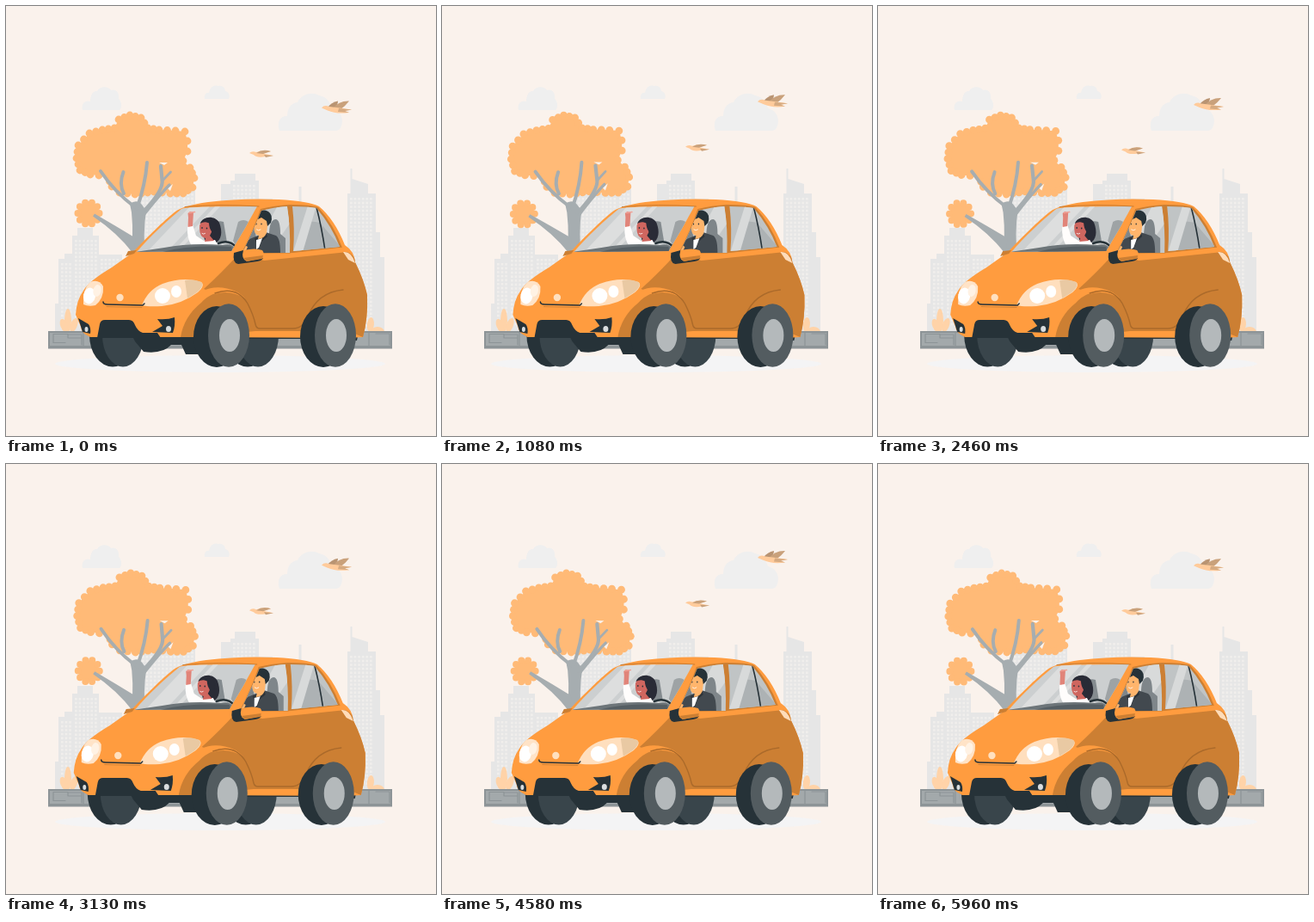
Recreate the animation shown at these times as an HTML page with a canvas. Size 500x500 px, loop 6000 ms.

```html
<!DOCTYPE html>
<html lang="en">
<head>
<meta charset="utf-8">
<title>City drive</title>
<style>
html, body { margin: 0; width: 100%; height: 100%; overflow: hidden; background: #faf2ec; }
canvas { display: block; width: 500px; height: 500px; }
</style>
</head>
<body>
<canvas id="stage" width="500" height="500"></canvas>
<script>
const canvas = document.getElementById('stage');
const ctx = canvas.getContext('2d');
const LOOP = 6000;
const SKY = '#faf2ec', CITY = '#e6e6e6', CLOUD = '#efefef', LEAF = '#ffba77', BARK = '#a6adb0';
const ORANGE = '#ff9c3f', SHADE = '#cc7f33', SEAM = '#ab6a2a', DARK = '#263238';

function fill(d, color) {
  ctx.fillStyle = color;
  ctx.fill(new Path2D(d));
}
function line(d, color, width) {
  ctx.strokeStyle = color;
  ctx.lineWidth = width;
  ctx.stroke(new Path2D(d));
}
function oval(x, y, rx, ry, color, turn = 0) {
  ctx.fillStyle = color;
  ctx.beginPath();
  ctx.ellipse(x, y, rx, ry, turn, 0, Math.PI * 2);
  ctx.fill();
}
function box(x, y, w, h, color) {
  ctx.fillStyle = color;
  ctx.fillRect(x, y, w, h);
}
function clipped(d, draw) {
  ctx.save();
  ctx.clip(new Path2D(d));
  draw();
  ctx.restore();
}
function moved(x, y, draw) {
  ctx.save();
  ctx.translate(x, y);
  draw();
  ctx.restore();
}

// Linear interpolation between [time, value] stops
function track(p, stops) {
  let i = 1;
  while (i < stops.length - 1 && p > stops[i][0]) i++;
  const [a, u] = stops[i - 1], [b, v] = stops[i];
  return u + (v - u) * (p - a) / (b - a);
}
const SHAKE = [0, -1, 2, -4, 4, -4, 4, -4, 2, -1, 0].map((v, i) => [i / 10, v]);
const SWAY = [[0, 0], [.25, 1], [.75, -1], [1, 0]];

function windows(x, y, w, h) {
  for (let j = 0; j + 2 <= h; j += 4.6)
    for (let i = 0; i + 2 <= w; i += 4.6) box(x + i, y + j, 2.7, 2.7, '#f0eeec');
}
function tower(x, y, w, bare) {
  box(x, y, w, 380 - y, CITY);
  if (!bare) windows(x + 3, y + 5, w - 5, 370 - y);
}

function clouds() {
  fill('M89 121C87 113 93 109 98 111C98 104 101 98 106 99C109 93 119 93 122 98C128 96 132 101 131 108C135 111 135 119 132 121Z', CLOUD);
  fill('M231 108C230 103 233 100 236 101C237 94 242 91 247 93C252 92 255 96 255 99C259 100 261 104 259 108Z', CLOUD);
  fill('M318 145C315 136 318 127 327 128C327 119 331 113 339 112C343 103 355 99 364 104C374 106 377 113 379 119C389 121 394 132 389 142Q387 145 384 145Z', CLOUD);
}

function city() {
  tower(57, 346, 6, true);
  tower(61, 294, 26);
  box(68, 288, 14, 8, CITY);
  tower(77, 267, 31);
  box(83, 258, 18, 10, CITY);
  tower(107, 289, 28);
  tower(155, 218, 63);
  tower(203, 213, 17);
  tower(250, 207, 14, true);
  tower(261, 203, 33);
  box(266, 195, 24, 9, CITY);
  tower(292, 224, 18, true);
  box(340.5, 210, 3, 40, CITY);
  tower(397, 218, 33);
  fill('M400.5 219V189H402.5V201L421 207V219Z', CITY);
  tower(429, 263, 6, true);
  tower(434, 292, 6, true);
}

function leaf(x, h, turn) {
  ctx.save();
  ctx.translate(x, 379);
  ctx.rotate(turn);
  oval(0, -h / 2, 4, h / 2, '#ffd3a8');
  ctx.restore();
}

function street() {
  oval(249, 416, 192, 10, '#f4f4f5');
  leaf(72, 27, 0);
  leaf(70, 16, -.35);
  leaf(76, 17, .35);
  leaf(423, 17, .1);
  oval(432, 379, 8, 6, '#ffd3a8');
  box(49, 378, 400, 20.5, '#8d9497');
  box(51, 380, 396, 15, '#a3a9ab');
  line('M55 381.5H72V386H88M55 381.5V391.5H69M73 382H88V394M90 380V395M422 380V395M430 381H446V394', '#8d9497', 1.2);
}

// Fills a rounded outline with small bumps along its rim
function leafy(points, r) {
  ctx.fillStyle = LEAF;
  ctx.beginPath();
  points.forEach(([x, y]) => ctx.lineTo(x, y));
  ctx.fill();
  points.forEach(([x, y], i) => {
    const [u, v] = points[(i + 1) % points.length];
    const n = Math.max(1, Math.round(Math.hypot(u - x, v - y) / (r * 1.9)));
    for (let k = 0; k < n; k++) oval(x + (u - x) * k / n, y + (v - y) * k / n, r, r, LEAF);
  });
}
const CROWN = [[144, 127], [131, 132], [126, 142], [112, 144], [97, 148], [84, 162], [82, 177], [86, 191], [98, 196],
  [118, 198], [123, 210], [132, 217], [150, 219], [172, 216], [191, 218], [206, 218], [217, 211], [219, 200],
  [214, 188], [206, 180], [211, 169], [211, 157], [208, 146], [197, 145], [178, 144], [165, 142], [157, 130]];
const TUFT = Array.from({ length: 10 }, (_, i) => {
  const a = i / 10 * Math.PI * 2;
  return [96 + 12.5 * Math.cos(a), 241 + 13 * Math.sin(a)];
});

function tree(angle) {
  ctx.save();
  ctx.translate(150, 285);
  ctx.rotate(angle * Math.PI / 180);
  ctx.translate(-150, -285);
  leafy(CROWN, 4.4);
  leafy(TUFT, 4);
  fill('M178 182L188 182L184 185ZM188 212L194 207L191 215Z', SKY);
  fill('M144 298Q149 270 146 240L144 230Q152 224 158 231L163 238Q159 263 162 298Z', BARK);
  line('M150 234Q126 216 110 192M137 218Q131 207 136.5 193', BARK, 4);
  line('M152 236Q162 208 164 182', BARK, 4);
  line('M158 241Q184 214 181.5 202L180 186', BARK, 4.2);
  line('M183 202L191.5 193', BARK, 2.8);
  line('M160 243Q179 219 190 208', BARK, 3.4);
  fill('M103 241.5Q128 256 151 270L148 288Q130 264 101 244.5Z', BARK);
  ctx.restore();
}

function birds(y) {
  moved(0, y, () => {
    fill('M374 118Q378 112 386 110.5Q386 115 381 120Z', '#b99472');
    fill('M380 119Q387 110 399 110.5Q395 116 388 121Z', '#c9a17b');
    fill('M367 118.5Q370 114.5 376 117L388 118.5L402 120.5L394 122L399 124Q384 126 374 121.5Z', '#ffcb9b');
    fill('M387 119L402 120.5L394 122L399 124L386 123Z', '#d6ab82');
    fill('M283 171Q286 168 291 170Q299 167 308 169L299 171.5L311 174L302 175Q292 177 288 173Z', '#ffcb9b');
    fill('M291 171Q298 166 308 169L299 172ZM300 173L311 174L302 176Z', '#c9a17b');
  });
}

function wheel(x) {
  oval(x - 14, 384.5, 27, 35.5, DARK);
  oval(x, 383, 24, 36.7, '#535c60');
  oval(x + 1, 383, 12, 19, '#b4b9bb');
}
function farWheel(x) {
  oval(x - 12, 383, 27, 36.5, DARK);
  oval(x, 383, 24, 36.5, '#39454b');
}

function woman() {
  fill('M227 254C227 244 243 243 248 252C252 262 251 272 243 276L231 272Z', '#292b36');
  fill('M211 256L217 254L221 267L230 273L243 272L247 279L216 279Q210 270 211 256Z', '#fffdfc');
  fill('M211.5 257L212 246L211.5 241L214 239L218 240L217 256Z', '#e18479');
  line('M213 240.5L219.5 239.5', '#f0a297', 1.6);
  fill('M225 258Q225 250 231 250L239 254L239 263L237 267L242 273L231 274L232 270Q225 269 225 258Z', '#cf665f');
  fill('M225.5 253Q228 246 236 247Q245 248 245 261L239.5 263Q236 258 236 252Q230 250 225.5 253Z', '#292b36');
  line('M228 264.5Q229.5 266 231.5 264.5', '#fff', .8);
  oval(228, 258, .8, 1, DARK);
  oval(233.5, 258.5, .8, 1, DARK);
}

function man() {
  fill('M277 283Q277 272 288 269L302 263L314 267Q319 270 319 287H275Z', '#42494f');
  fill('M289 270L297 267L302 263L304 268L297 274L294 283Z', '#2e3439');
  fill('M291 272L298 270L294 281L291 283Z', '#fff');
  fill('M289 247L302 244L307 252L304 256L303 264Q300 271 293 271L294 267Q288 266 288.5 257Z', '#ffb56c');
  fill('M288 248Q287 241 292 239.5Q299 235.5 305 239Q311 243 308 252L304 256L303 250L297 246Q292 249 288 248Z', DARK);
  oval(291, 253.5, .7, 1, DARK);
  oval(297, 253.5, .7, 1, DARK);
  line('M291.5 260Q293.5 262 296 260', '#fff', .8);
  fill('M272 280L276 277L281 280L278 287L270 288Z', '#ffb56c');
}

const FRONT_GLASS = 'M152 286C167 268 188 249 204 236Q208 233 292 233Q278 259 262 285Z';
const DOOR_GLASS = 'M275 287Q289 258 297 238Q311 234 327 233Q331 259 330 287Z';
const REAR_GLASS = 'M333 233Q351 233 361 235Q379 256 388 280L334 285Q336 259 333 233Z';

function cabin() {
  clipped(FRONT_GLASS, () => {
    box(150, 230, 145, 60, '#cccfd0');
    fill('M214 233H237L187 286H164ZM243 233H249L200 286H194Z', '#dddede');
    fill('M240 258Q243 248 253 251L257 275H240Z', '#848b8f');
    fill('M264 273L270 251Q276 247 282 251L270 283Z', '#9ea3a5');
    woman();
    line('M247 276Q260 271 268 281', DARK, 2.5);
    fill('M150 286L184 281Q216 275 252 278Q263 275 267 283L262 290H150Z', '#6d7579');
    fill('M182 286Q215 277 262 280L264 288H182Z', '#555e63');
  });
  clipped(DOOR_GLASS, () => {
    box(270, 230, 65, 60, '#c4c8c9');
    fill('M316 232H327L330 253L306 287H286Z', '#d8dada');
    fill('M281 270Q281 250 287 249L292 274ZM306 272Q305 248 314 248Q319 249 319 265L325 270V288H306Z', '#7f868a');
    man();
  });
  clipped(REAR_GLASS, () => {
    box(330, 230, 62, 58, '#c0c4c5');
    fill('M340 286Q342 266 346 252Q354 249 365 252L389 280Z', '#adb2b4');
    fill('M351 232H361L345 286H334Z', '#d8dada');
    line('M361 234Q367 257 371 284', DARK, 1.6);
  });
}

function lamps() {
  fill('M90 347Q89 329 98 321Q108 317 113 326Q114 340 104 348Q96 350 90 347Z', '#ffe3c7');
  oval(97, 337, 7, 9.5, '#fff', .2);
  oval(106, 331, 4.5, 7, '#fff2e4', .2);
  fill('M158 348Q165 330 182 323Q207 314 227 321Q232 325 223 333Q204 347 181 349Q165 350 158 348Z', '#ffdfbe');
  fill('M208 319Q222 317 228 322Q230 326 222 333L211 340Z', '#e9c9a3');
  oval(182, 337, 9, 9, '#fff');
  oval(198, 332, 6, 7, '#fff');
  fill('M84 363L96 370Q99 374 98 381L89 379Z', DARK);
  oval(93.5, 376, 2, 3, '#d9dddf');
  fill('M170 379L182 372L176 364Q188 365 196 362Q197 372 194 380Z', DARK);
  oval(189, 375.5, 3, 3.5, '#d9dddf');
}

function car() {
  farWheel(136);
  farWheel(293);
  fill('M145 380H350V387H224V405H209L204 394L192 394Q182 405 160 402L150 390Z', DARK);
  fill('M396 370H412L408 389H396Z', DARK);

  // Body, shaded side and window frame
  fill('M147 287C163 270 184 249 197 239Q206 232 235 228Q275 223 317 225Q352 227 364 233Q382 248 394 278Q405 285 406 298Q416 318 420 336Q421 364 415 385L398 386L217 385H98Q87 380 87 373L81 359Q82 342 90 331Q96 320 123 304Z', ORANGE);
  fill('M271 288L300 296Q350 291 397 286Q406 290 406 298Q416 318 420 336Q421 364 415 385L398 378H290L223 385H203Q207 361 227 345Q233 338 243 334L230 329Q249 312 271 288Z', SHADE);
  fill('M273 289Q288 260 296 236Q312 232 330 231Q354 231 363 234Q381 254 391 281L331 288Z', SHADE);
  fill('M229 331Q242 325 257 328.5Q270 331 278 340Q260 329 243 335Z', ORANGE);
  line('M243 334Q268 325 281 346Q288 360 290 370Q291 375 295 375H334Q345 375 351 361Q362 333 392 330', SEAM, 1.4);

  cabin();
  line('M208 233.5Q249 230 294 233', '#b9732e', .8);
  line('M276 289.5L331 288.5L391 282', ORANGE, 2.5);
  fill('M139 291L142 285L152 284L149 288Z', SHADE);

  // Mirror and tail lamp
  fill('M265 287L276 284L277 295L299 292Q299 296 292 297L270 300Q263 299 265 287Z', DARK);
  fill('M276 284Q290 281 298 284Q301 288 299 293L280 297Q273 294 276 284Z', ORANGE);
  fill('M276 293L299 290L298 294L280 297Z', SHADE);
  fill('M392 286Q402 285 406 299L398 295Z', '#ffdcb9');

  lamps();
  line('M113 344Q113 347 118 347L159 348L161 346', DARK, 1.5);
  line('M117 349.5L158 350.5', '#d28335', 1);
  oval(132.5, 339, 4.2, 4.2, '#ffe0bf');
  fill('M106 386L109 370Q110 365 115 365H143Q148 365 150 371Q153 378 159 380H176L180 386Z', DARK);

  wheel(259);
  wheel(383);
}

function draw(now) {
  const t = now % LOOP;
  const sway = track(t % 1500 / 1500, SWAY);
  const lift = -10 * (1 - Math.abs(t % 3000 / 1500 - 1));
  ctx.lineCap = 'round';
  ctx.lineJoin = 'round';
  box(0, 0, 500, 500, SKY);
  clouds();
  city();
  street();
  tree(sway);
  birds(lift);
  moved(track(t / LOOP, SHAKE), 0, car);
}

let start;
function tick() {
  const now = performance.now();
  if (start === undefined) start = now;
  draw(now - start);
  requestAnimationFrame(tick);
}
tick();
</script>
</body>
</html>
```
